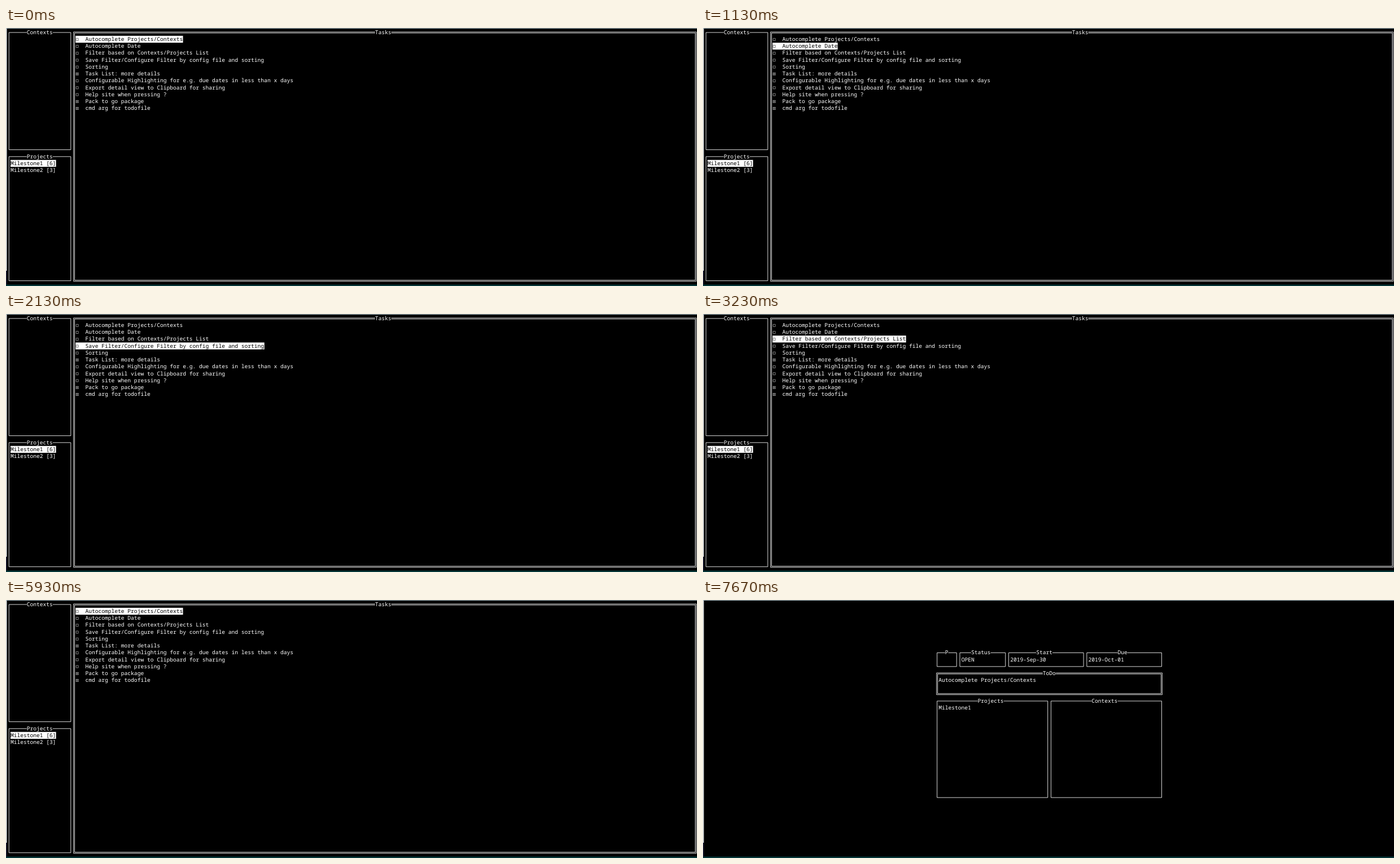
An HTML page for the animation above (8 s loop, 1224x457 px).

```html
<!DOCTYPE html>
<html lang="en">
<head>
<meta charset="utf-8">
<title>Task list</title>
<style>
html, body { margin: 0; width: 100%; height: 100%; overflow: hidden; background: #000; }
svg { display: block; width: 100vw; height: 100vh; }
text { font: 9.61px "Noto Sans Mono", "DejaVu Sans Mono", monospace; text-rendering: geometricPrecision; }
</style>
</head>
<body>
<svg id="stage" viewBox="0 0 1224 457"></svg>
<script>
const CW = 5.766, CH = 12.215, X0 = 2.15, Y0 = 1.6, LOOP = 8000;
const colX = c => X0 + c * CW;
const rowY = r => Y0 + r * CH;
const midX = c => colX(c + 0.5) + 0.2;
const midY = r => rowY(r + 0.5) + 0.25;

const stage = document.getElementById("stage");

function add(parent, tag, attrs, content) {
  const el = document.createElementNS("http://www.w3.org/2000/svg", tag);
  for (const key in attrs) el.setAttribute(key, attrs[key]);
  if (content) el.textContent = content;
  parent.appendChild(el);
  return el;
}

function bar(parent, x, y, width, height, fill) {
  return add(parent, "rect", { x, y, width, height, fill });
}

// The tiny rotation keeps baselines from snapping to whole pixels
function label(parent, col, row, str, fill = "#fff") {
  const x = colX(col), y = rowY(row) + 9.2;
  return add(parent, "text", { x, y, fill, transform: `rotate(0.01 ${x} ${y})` }, str);
}

// Frame drawn through cell centres, open where its title stands
function panel(parent, title, c1, r1, c2, r2, double) {
  const start = c1 + Math.floor((c2 - c1 + 1 - title.length) / 2);
  const gapL = colX(start), gapR = colX(start + title.length);
  const d = (double ? [-0.95, 0.95] : [0]).map(o => {
    const l = midX(c1) + o, r = midX(c2) - o, t = midY(r1) + o, b = midY(r2) - o;
    return `M${gapL} ${t}H${l}V${b}H${r}V${t}H${gapR}`;
  }).join("");
  add(parent, "path", { d, fill: "none", stroke: "#fff", "stroke-width": 0.85 });
  label(parent, start, r1, title);
}

function highlight(parent, col, row, chars) {
  bar(parent, colX(col), rowY(row), chars * CW, CH, "#fff");
}

function checkbox(parent, row, done) {
  const x = colX(21) + 0.9, y = rowY(row) + 4.5;
  const cross = done ? "l4 4m0 -4l-4 4" : "";
  return add(parent, "path", {
    d: `M${x} ${y}h4v4h-4z${cross}`, fill: "none", stroke: "#fff", "stroke-width": 0.5
  });
}

const tasks = [
  ["Autocomplete Projects/Contexts"],
  ["Autocomplete Date"],
  ["Filter based on Contexts/Projects List"],
  ["Save Filter/Configure Filter by config file and sorting"],
  ["Sorting"],
  ["Task List: more details", true],
  ["Configurable Highlighting for e.g. due dates in less than x days"],
  ["Export detail view to Clipboard for sharing"],
  ["Help site when pressing ?"],
  ["Pack to go package", true],
  ["cmd arg for todofile", true]
];

// Window edges
bar(stage, 0, 0, 1224, 457, "#000");
bar(stage, 0, 430, 2, 27, "#17172a");
bar(stage, 0, 0, 1.5, 430, "#e4e8ea");
bar(stage, 0, 0, 1224, 1, "#a9bcc4");
bar(stage, 0, 454.5, 1224, 2.5, "#053638");

const list = add(stage, "g", {});
panel(list, "Contexts", 0, 0, 19, 17);
panel(list, "Projects", 0, 18, 19, 36);
panel(list, "Tasks", 20, 0, 211, 36, true);
highlight(list, 1, 19, 14);
label(list, 1, 19, "Milestone1 [6]", "#000");
label(list, 1, 20, "Milestone2 [3]");

const rows = tasks.map(([name, done], i) => {
  const mark = add(list, "g", {});
  highlight(mark, 21, i + 1, name.length + 3);
  return { mark, box: checkbox(list, i + 1, done), text: label(list, 24, i + 1, name) };
});

const detail = add(stage, "g", {});
panel(detail, "P", 71, 7, 77, 9);
panel(detail, "Status", 78, 7, 92, 9);
panel(detail, "Start", 93, 7, 116, 9);
panel(detail, "Due", 117, 7, 140, 9);
panel(detail, "ToDo", 71, 10, 140, 13, true);
panel(detail, "Projects", 71, 14, 105, 28);
panel(detail, "Contexts", 106, 14, 140, 28);
label(detail, 79, 8, "OPEN");
label(detail, 94, 8, "2019-Sep-30");
label(detail, 118, 8, "2019-Oct-01");
label(detail, 72, 11, tasks[0][0]);
label(detail, 72, 15, "Milestone1");

// [time, selected task]; -1 opens the detail view
const steps = [[0, 0], [1130, 1], [1500, 2], [2130, 3], [3230, 2], [4330, 1], [5930, 0], [7670, -1]];
const show = (el, on) => el.setAttribute("display", on ? "inline" : "none");

function render(t) {
  let selected = 0;
  for (const [time, index] of steps) if (t >= time) selected = index;
  show(list, selected >= 0);
  show(detail, selected < 0);
  rows.forEach(({ mark, box, text }, i) => {
    const on = i === selected, ink = on ? "#000" : "#fff";
    show(mark, on);
    box.setAttribute("stroke", ink);
    text.setAttribute("fill", ink);
  });
}

const begin = performance.now();
function tick() {
  render((performance.now() - begin) % LOOP);
  requestAnimationFrame(tick);
}
tick();
</script>
</body>
</html>
```
